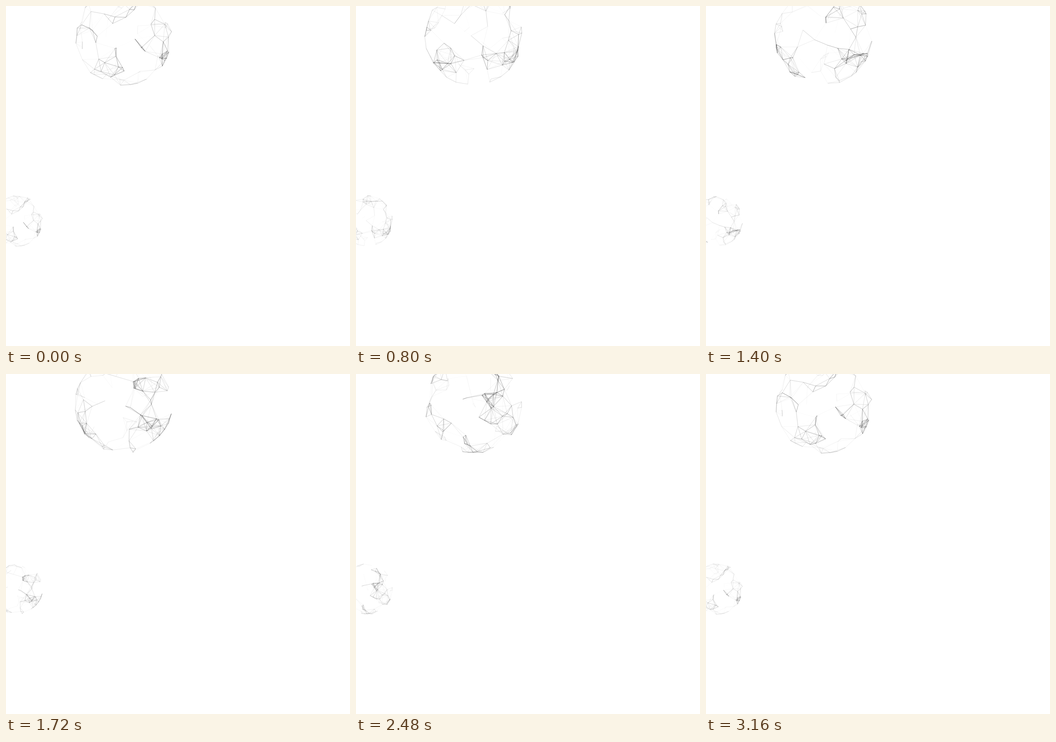
Animation of 752 by 745 pixels, one loop 3200 ms. Source, as an HTML page with a canvas:

```html
<!DOCTYPE html>
<html lang="en">
<head>
<meta charset="utf-8">
<title>Drifting web spheres</title>
<style>
html, body { margin: 0; width: 100%; height: 100%; overflow: hidden; background: #fff; }
canvas { display: block; }
</style>
</head>
<body>
<canvas id="stage" width="752" height="745"></canvas>
<script>
const ctx = document.getElementById('stage').getContext('2d');
const LOOP = 3200, STEP = 40, TAU = 2 * Math.PI;
const R = 107, REACH = 46, DEPTH_WEIGHT = 0.5;
const SPREAD = 76, PER_HUB = 6;

// Directions around which the web is denser.
const hubs = [[0.2, 0.3, 0.9], [0.8, 0.4, 0.35], [-0.75, 0.4, 0.4], [0.25, -0.5, 0.8]];

let seed = 29;
function rand() {
  seed = (seed + 0x6D2B79F5) | 0;
  let t = Math.imul(seed ^ (seed >>> 15), seed | 1);
  t ^= t + Math.imul(t ^ (t >>> 7), t | 61);
  return ((t ^ (t >>> 14)) >>> 0) / 4294967296;
}

const dot = (a, b) => a[0] * b[0] + a[1] * b[1] + a[2] * b[2];
const cross = (a, b) => [
  a[1] * b[2] - a[2] * b[1],
  a[2] * b[0] - a[0] * b[2],
  a[0] * b[1] - a[1] * b[0]
];
function unit(v) {
  const len = Math.hypot(...v);
  return v.map(c => c / len);
}
const scatter = (v, amount) => unit(v.map(c => c + amount * (rand() - 0.5)));

// Each point circles a nearby axis, so it stays on the sphere.
function makePoint(axis) {
  const tangent = unit(cross(axis, [rand() - 0.5, rand() - 0.5, rand() - 0.5]));
  const tilt = 0.1 + 0.28 * rand();
  return {
    axis: axis.map(c => c * Math.cos(tilt)),
    u: tangent.map(c => c * Math.sin(tilt)),
    v: cross(axis, tangent).map(c => c * Math.sin(tilt)),
    turn: rand() < 0.5 ? -1 : 1
  };
}

const points = [];
for (let i = 0; i < SPREAD; i++) {
  const y = 1 - (2 * i + 1) / SPREAD, r = Math.sqrt(1 - y * y), a = i * 2.4;
  points.push(makePoint(scatter([r * Math.cos(a), y, r * Math.sin(a)], 0.4)));
}
for (const hub of hubs) {
  for (let i = 0; i < PER_HUB; i++) points.push(makePoint(scatter(hub, 0.6)));
}

function locate({ axis, u, v, turn }, phase) {
  const c = Math.cos(phase), s = turn * Math.sin(phase);
  return axis.map((k, i) => R * (k + u[i] * c + v[i] * s));
}

function findLinks(spots) {
  const links = [];
  for (let i = 0; i < spots.length; i++) {
    for (let j = 0; j < i; j++) {
      const a = spots[i], b = spots[j];
      const d = Math.hypot(a[0] - b[0], a[1] - b[1], (a[2] - b[2]) * DEPTH_WEIGHT) / REACH;
      if (d >= 1) continue;
      const front = (a[2] + b[2]) / (4 * R) + 0.5;
      links.push({ a, b, alpha: (0.06 + 0.42 * front) * (1 - d * d) });
    }
  }
  return links;
}

function drawSphere(links, x, y, scale) {
  ctx.setTransform(scale, 0, 0, scale, x, y);
  ctx.lineWidth = 0.9;
  for (const { a, b, alpha } of links) {
    ctx.strokeStyle = `rgba(30,30,30,${alpha})`;
    ctx.beginPath();
    ctx.moveTo(a[0], a[1]);
    ctx.lineTo(b[0], b[1]);
    ctx.stroke();
  }
}

function draw() {
  const time = Math.floor(performance.now() % LOOP / STEP) * STEP;
  const links = findLinks(points.map(p => locate(p, TAU * time / LOOP)));
  ctx.setTransform(1, 0, 0, 1, 0, 0);
  ctx.clearRect(0, 0, 752, 745);
  drawSphere(links, 256.5, 67, 1);
  drawSphere(links, 24.5, 471, 0.52);
  requestAnimationFrame(draw);
}
draw();
</script>
</body>
</html>
```
